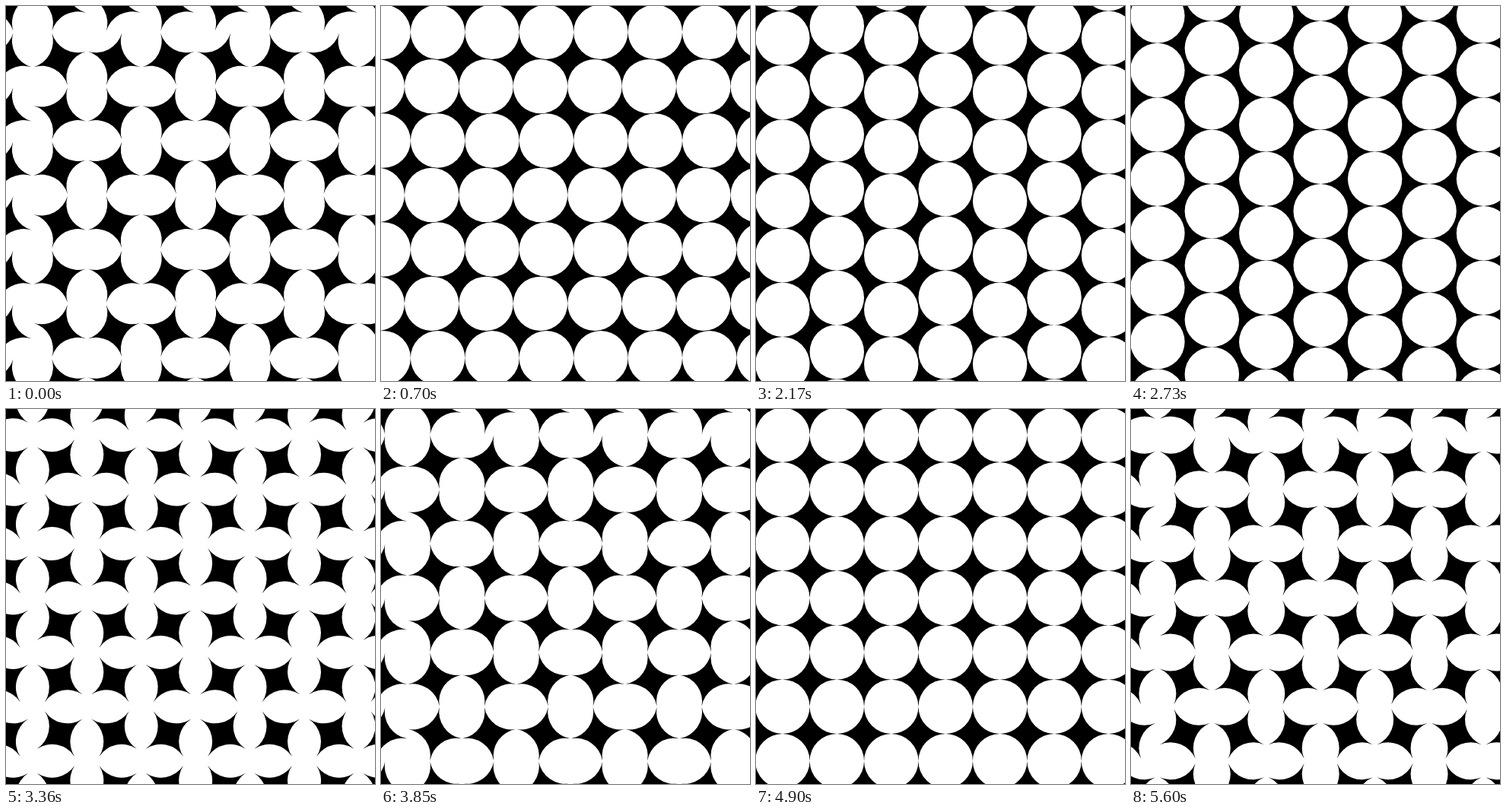
Animation, 485 px wide and 493 px high, one loop 5670 ms. Source, as an HTML page with a canvas:

```html
<!DOCTYPE html>
<html lang="en">
<head>
<meta charset="utf-8">
<title>Circles and stars</title>
<style>
  html, body { margin: 0; width: 100%; height: 100%; overflow: hidden; background: #000; }
  canvas { display: block; }
</style>
</head>
<body>
<canvas id="stage" width="485" height="493"></canvas>
<script>
const W = 485, H = 493;
const ctx = document.getElementById("stage").getContext("2d");

const CELL = 500 / 7, R = CELL / 2;
const X0 = 34.9, Y0 = 34.2;          // centre of the first circle at rest
const STEP = 70, STEPS = 81;
const PHASE = 13.5;                  // steps per slide or turn
const OFFSET = 2.5;                  // step at which the first slide begins

// Black region enclosed by four touching circles
const star = new Path2D();
star.arc(R, -R, R, Math.PI, Math.PI / 2, true);
star.arc(R, R, R, -Math.PI / 2, -Math.PI, true);
star.arc(-R, R, R, 0, -Math.PI / 2, true);
star.arc(-R, -R, R, Math.PI / 2, 0, true);
star.closePath();

function fill(color) {
  ctx.fillStyle = color;
  ctx.fillRect(0, 0, W, H);
}

function eachCell(draw) {
  for (let row = -2; row <= 8; row++)
    for (let col = -2; col <= 8; col++) draw(col, row);
}

// Neighbouring rows (or columns) of circles pass each other by one cell
function drawSlide(p, vertical) {
  fill("#000");
  ctx.fillStyle = "#fff";
  eachCell((col, row) => {
    const lane = vertical ? col : row;
    const shift = (lane % 2 ? -1 : 1) * p * CELL;
    const x = X0 + col * CELL + (vertical ? 0 : shift);
    const y = Y0 + row * CELL + (vertical ? shift : 0);
    ctx.beginPath();
    ctx.arc(x, y, R, 0, 2 * Math.PI);
    ctx.fill();
  });
}

// Neighbouring stars make a quarter turn in opposite directions.
// The signed remainder makes the border at index -1 break the checkerboard.
function drawTurn(p, dir) {
  fill("#fff");
  ctx.fillStyle = "#000";
  eachCell((col, row) => {
    const sign = col % 2 === row % 2 ? dir : -dir;
    ctx.save();
    ctx.translate(X0 + R + col * CELL, Y0 + R + row * CELL);
    ctx.rotate(sign * p * Math.PI / 2);
    ctx.fill(star);
    ctx.restore();
  });
}

function render(step) {
  const u = (step - OFFSET) / PHASE + 4;
  const phase = Math.floor(u) % 4, p = u % 1;
  const second = phase >= 2;
  if (phase % 2) drawTurn(p, second ? 1 : -1);
  else drawSlide(p, second);
}

const start = performance.now();
function tick() {
  const t = Math.max(0, performance.now() - start);
  render(Math.floor(t / STEP) % STEPS);
  requestAnimationFrame(tick);
}
tick();
</script>
</body>
</html>
```
